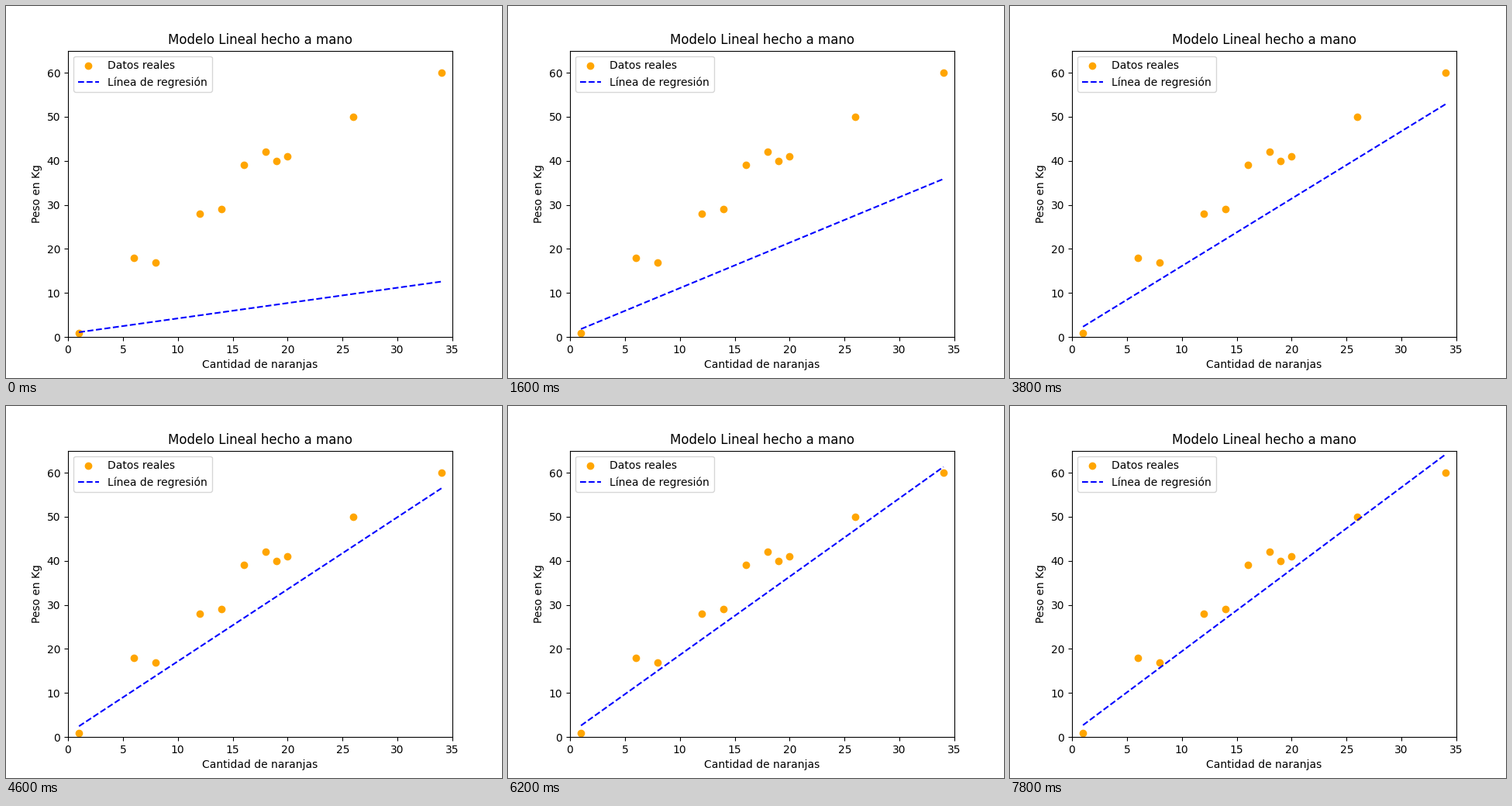
Animation of 640x480 px, one loop 8 s. Source, as a matplotlib script:

```python
import numpy as np
import matplotlib.pyplot as plt
from matplotlib.animation import FuncAnimation

FRAMES = 40
INTERVAL = 200
RATE = 1e-4
START = (0.348, 0.76)  # slope, intercept

x = np.array([1, 6, 8, 12, 14, 16, 18, 19, 20, 26, 34], dtype=float)
y = np.array([1, 18, 17, 28, 29, 39, 42, 40, 41, 50, 60], dtype=float)


def descend(steps):
    """Slope and intercept after some steps of gradient descent."""
    m, b = START
    for _ in range(steps):
        error = m * x + b - y
        m, b = (m - RATE * 2 * np.mean(error * x),
                b - RATE * 2 * np.mean(error))
    return m, b


fig, ax = plt.subplots(figsize=(6.4, 4.8), dpi=100)
ax.scatter(x, y, color="orange", label="Datos reales")
line, = ax.plot([], [], color="blue", linestyle="--",
                label="Línea de regresión")
ax.set_xlim(0, 35)
ax.set_ylim(0, 65)
ax.set_title("Modelo Lineal hecho a mano")
ax.set_xlabel("Cantidad de naranjas")
ax.set_ylabel("Peso en Kg")
ax.legend(loc="upper left")


def update(frame):
    m, b = descend(frame)
    line.set_data(x, m * x + b)
    return line,


anim = FuncAnimation(fig, update, frames=FRAMES, interval=INTERVAL,
                     repeat=True, repeat_delay=0)
plt.show()
```
